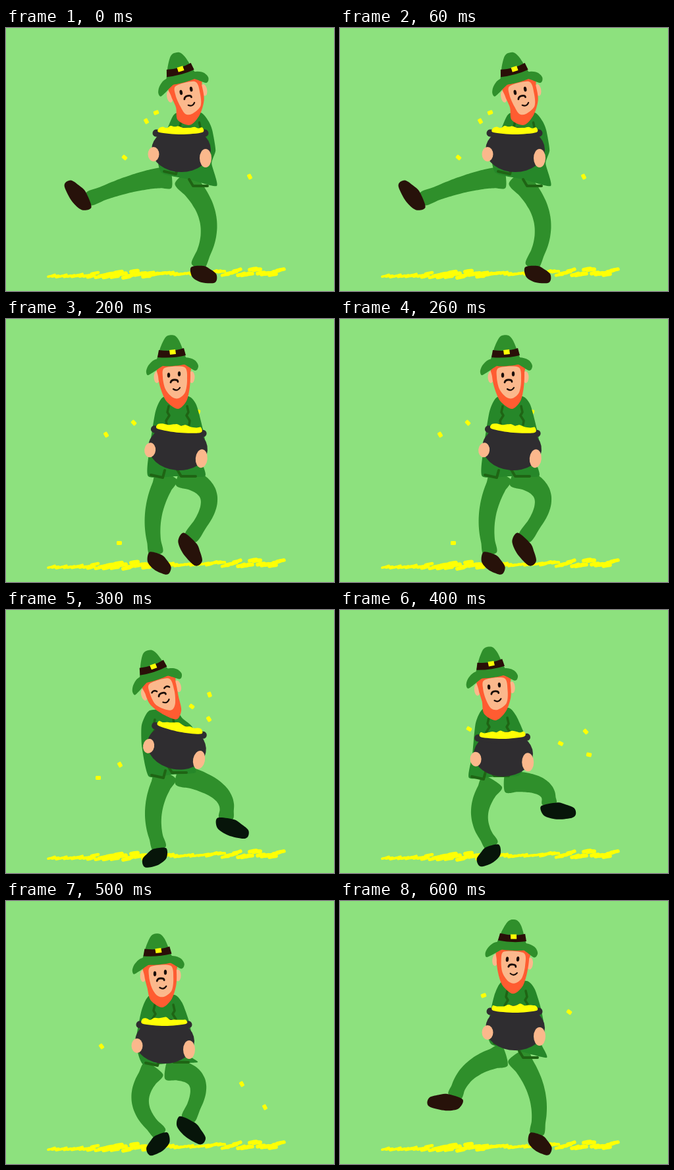
Write an HTML page that moves like this. It is 498 px wide and 398 px high and loops after 700 ms.

```html
<!DOCTYPE html>
<html lang="en">
<head>
<meta charset="utf-8">
<title>Dancing leprechaun</title>
<style>
  html, body { margin: 0; width: 100%; height: 100%; overflow: hidden; background: #8de17e; }
  svg { display: block; width: 100%; height: 100%; }
</style>
</head>
<body>
<svg id="stage" viewBox="0 0 498 398"></svg>
<script>
const STEP = 100;
const C = {
  green: '#2f8f2b', coat: '#268729', trim: '#1f6414', skin: '#fbb88c', beard: '#ff5c31',
  pot: '#2f2d30', gold: '#ffff05', band: '#2a0f08', ink: '#1a0d08', brown: '#27120a', black: '#07150a'
};

// head, pot: x, y, angle. tails: coat corners seen from the pot.
// legs: knee, ankle, shoe angle, toe side.
const poses = [
  { head: [273.5, 95, -11], chin: -10, pot: [266, 185, 0], tails: [[-30, 34], [54, 54]], shoe: C.brown,
    legs: [[193, 235, 125, 259, 65, -1], [307, 291, 291, 361, 0, 1]],
    coins: [[228, 128], [213, 141], [180, 196], [370, 225]] },
  { head: [262, 84.5, 0], chin: 2, pot: [259, 185, 5], tails: [[-57, 21], [46, 52]], shoe: C.black,
    legs: [[171, 254, 181, 316, 22, -1], [307, 289, 288, 361, 0, 1]],
    coins: [[169, 125], [198, 142], [292, 139], [127, 242], [369, 300]] },
  { head: [255, 84, 0], chin: 0, pot: [261, 196, 5], tails: [[-45, 42], [41, 42]], shoe: C.brown,
    legs: [[224, 295, 228, 355, 20, 1], [308, 270, 280, 332, 45, 1]],
    coins: [[194, 157], [152, 175], [291, 140], [172, 339]] },
  { head: [234, 118, -14], chin: 7, pot: [259, 208, 11], tails: [[-42, 44], [29, 38]], shoe: C.black, wink: true,
    legs: [[224, 305, 233, 361, -10, -1], [324, 276, 334, 316, 10, 1]],
    coins: [[309, 128], [282, 146], [308, 165], [173, 234], [140, 254]] },
  { head: [234, 115, -4], chin: -7, pot: [248, 219, -1], tails: [[-52, 35], [22, 32]], shoe: C.black,
    legs: [[212, 309, 231, 357, -18, -1], [304, 267, 318, 294, -8, 1]],
    coins: [[196, 180], [335, 202], [373, 184], [378, 219]] },
  { head: [234, 109, -1], chin: -4, pot: [241, 213, 0], tails: [[-33, 34], [50, 31]], shoe: C.black,
    legs: [[204, 304, 235, 353, -22, -1], [290, 274, 276, 331, 28, 1]],
    coins: [[145, 220], [358, 277], [393, 312]] },
  { head: [262, 88, 6], chin: 0, pot: [266, 193, 0], tails: [[-36, 24], [48, 44]], shoe: C.brown,
    legs: [[199, 256, 174, 296, 15, -1], [299, 292, 299, 353, 20, 1]],
    coins: [[218, 143], [348, 168]] }
];

const svg = document.getElementById('stage');
const mix = (a, b, t) => a.map((v, i) => v + (b[i] - v) * t);
const pairs = s => s.split(' ').map(p => p.split(',').map(Number));
const from = ([x, y]) => (dx, dy) => [x + dx, y + dy];

let seed = 7;
const random = () => (seed = seed * 16807 % 2147483647) / 2147483647;

function add(parent, tag, attrs) {
  const el = document.createElementNS('http://www.w3.org/2000/svg', tag);
  for (const k in attrs) el.setAttribute(k, attrs[k]);
  return parent.appendChild(el);
}

// Closed Catmull-Rom outline
function blob(parent, p, fill, bend = 0.15) {
  const n = p.length, at = i => p[(i + n) % n];
  const handle = (i, sign) => at(i).map((v, a) => (v + sign * bend * (at(i + 1)[a] - at(i - 1)[a])).toFixed(1));
  let d = 'M' + p[0];
  for (let i = 0; i < n; i++) d += `C${handle(i, 1)} ${handle(i + 1, -1)} ${at(i + 1)}`;
  return add(parent, 'path', { d, fill });
}

const line = (parent, points, stroke, width) => add(parent, 'polyline', {
  points, stroke, fill: 'none', 'stroke-width': width, 'stroke-linecap': 'round', 'stroke-linejoin': 'round' });
const curve = (parent, d, width) => add(parent, 'path', {
  d, fill: 'none', stroke: C.ink, 'stroke-width': width, 'stroke-linecap': 'round' });
const oval = (parent, cx, cy, rx, ry, fill) => add(parent, 'ellipse', { cx, cy, rx, ry, fill });
const place = (parent, [x, y, turn = 0], side = 1) =>
  add(parent, 'g', { transform: `translate(${x} ${y}) rotate(${turn}) scale(${side} 1)` });

// Tapered leg bending through the knee
function drawLeg(parent, hip, knee, ankle) {
  const bend = mix(mix(hip, ankle, 0.5), knee, 1.54);
  const start = mix(bend, hip, 0.7), end = mix(bend, ankle, 0.7);
  const spine = [hip];
  for (let t = 0; t <= 1; t += 0.125) spine.push(mix(mix(start, bend, t), mix(bend, end, t), t));
  spine.push(ankle);
  const last = spine.length - 1;
  const edge = side => spine.map(([x, y], i) => {
    const [x0, y0] = spine[Math.max(i - 1, 0)], [x1, y1] = spine[Math.min(i + 1, last)];
    const r = side * (16 - 6 * i / last) / Math.hypot(x1 - x0, y1 - y0);
    return [x - (y1 - y0) * r, y + (x1 - x0) * r];
  });
  blob(parent, [...edge(1), ...edge(-1).reverse()], C.green);
}

// A lifted shoe shows more of its length.
function drawShoe(parent, [x, y], angle, side, fill) {
  const g = place(parent, [x, y, angle], side * (y < 340 ? 1.3 : 1));
  blob(g, pairs('-10,1 9,-1 19,4 28,11 29,20 24,25 6,24 -8,16'), fill);
}

// The sleeves widen on the side the body leans away from.
function drawCoat(parent, { head, pot, tails }) {
  const neck = from(head), belly = from(pot), lean = pot[0] - head[0];
  const left = -40 - lean / 2, right = 47 - lean * 0.7;
  const [tailL, tailR] = tails.map(t => belly(...t));
  blob(parent, [neck(-16, 34), neck(-28, 56), belly(left, 0), tailL, mix(tailL, tailR, 0.5), tailR,
    belly(right - 6, 20), belly(right, 0), belly(right - 5, -30), neck(34, 46), neck(22, 33)], C.coat, 0.1);
  const hemL = from(tailL), hemR = from(tailR);
  line(parent, [hemL(4, -2), hemL(22, 2), hemL(25, -9)], C.trim, 4);
  line(parent, [hemR(-42, -10), hemR(-36, 0), hemR(-14, 0)], C.trim, 4);
  for (const side of [-1, 1]) {
    const lapel = from(neck(6 + 14 * side, 48));
    line(parent, [lapel(0, 0), lapel(2 * side, 9), lapel(-side, 14), lapel(4 * side, 22), lapel(3 * side, 28)], C.trim, 3.5);
  }
}

function drawPot(parent, { pot }) {
  const g = place(parent, pot);
  oval(g, 0, -1, 45, 34, C.pot);
  line(g, [[-38, -26], [0, -22], [36, -26]], C.pot, 11);
  const heap = [[32, -27], [0, -24], [-33, -27]];
  for (let x = -34; x <= 32; x += 6) heap.push([x, -33 - 5 * random() * Math.cos(x / 28)]);
  blob(g, heap, C.gold);
  oval(g, -42, 6, 8.5, 11, C.skin);
  oval(g, 37, 12, 9, 14, C.skin);
}

function drawHead(parent, { head, chin, wink }) {
  const g = place(parent, head);
  for (const x of [-26, 27]) oval(g, x, 4, 4.5, 9, C.skin);
  blob(g, [[-23, -14], [-24, 3], [-20, 22], [chin - 11, 41], [chin + 6, 52], [chin * 0.6 + 19, 40], [24, 19], [25, -2], [23, -15]], C.beard);
  blob(g, [[-14, -10], [-17, 4], [-13, 22], [chin / 2 - 3, 34], [chin / 2 + 7, 36], [17, 27], [20, 8], [16, -11]], C.skin);
  for (const side of [-1, 1]) {
    if (wink) curve(g, `M${side * 10 - 4} ${3 - side}q4 -4 8 0`, 2.4);
    else oval(g, side * 8, -side, 2.2, 3.8, C.ink);
  }
  curve(g, 'M-5 12Q-4 8 1 8Q6 8 6 11', 2.8);
  curve(g, 'M-1 22Q5 26 9 20', 2.2);

  const hat = place(g, [-2, -34]);
  blob(hat, pairs('-22,20 -20,-2 -13,-19 -7,-25 3,-25 10,-17 17,1 20,18'), C.green);
  blob(hat, pairs('-40,28 -35,18 -22,10 18,8 33,12 39,21 34,28 15,18 -10,19 -30,31 -38,35'), C.green);
  add(hat, 'path', { d: 'M-21-3Q0 0 17-6L20 5Q0 10-23 8Z', fill: C.band });
  add(hat, 'path', { d: 'M-5-3L4-4L5 3L-4 4Z', fill: C.gold });
}

function drawPose(pose) {
  const g = add(svg, 'g', { opacity: 0 });
  for (const [x, y] of pose.coins)
    add(place(g, [x, y, random() * 90 - 20]), 'rect', { x: -4, y: -3, width: 8, height: 6, rx: 1.5, fill: C.gold });
  pose.legs.forEach(([kx, ky, ax, ay, angle, side], i) => {
    drawLeg(g, from(pose.pot)(i ? 3 : -16, 40), [kx, ky], [ax, ay]);
    drawShoe(g, [ax, ay], angle, side, pose.shoe);
  });
  drawCoat(g, pose);
  drawPot(g, pose);
  drawHead(g, pose);
  return g;
}

// Scattered gold, heaped up in two places
function drawGround() {
  for (let x = 64; x < 416; x += 6) {
    const heap = Math.sin(Math.PI * (x - 80) / 200) ** 2;
    const y = 377 - 8 * Math.sqrt((x - 64) / 360) + (random() - 0.5) * (3 + 7 * heap);
    line(svg, [[x, y + 1], [x + 5, y], [x + 10, y - 2 * random()]], C.gold, 3.5 + 2.5 * heap);
  }
}

add(svg, 'rect', { width: 498, height: 398, fill: '#8de17e' });
drawGround();

// Hold every pose, then cut hard to the next.
const duration = STEP * poses.length;
const easing = 'step-end';
poses.map(drawPose).forEach((g, i) => g.animate(
  [{ opacity: 1, easing }, { opacity: 0, offset: 1 / poses.length, easing }, { opacity: 0 }],
  { duration, iterations: Infinity, delay: i * STEP - duration }
));
</script>
</body>
</html>
```
